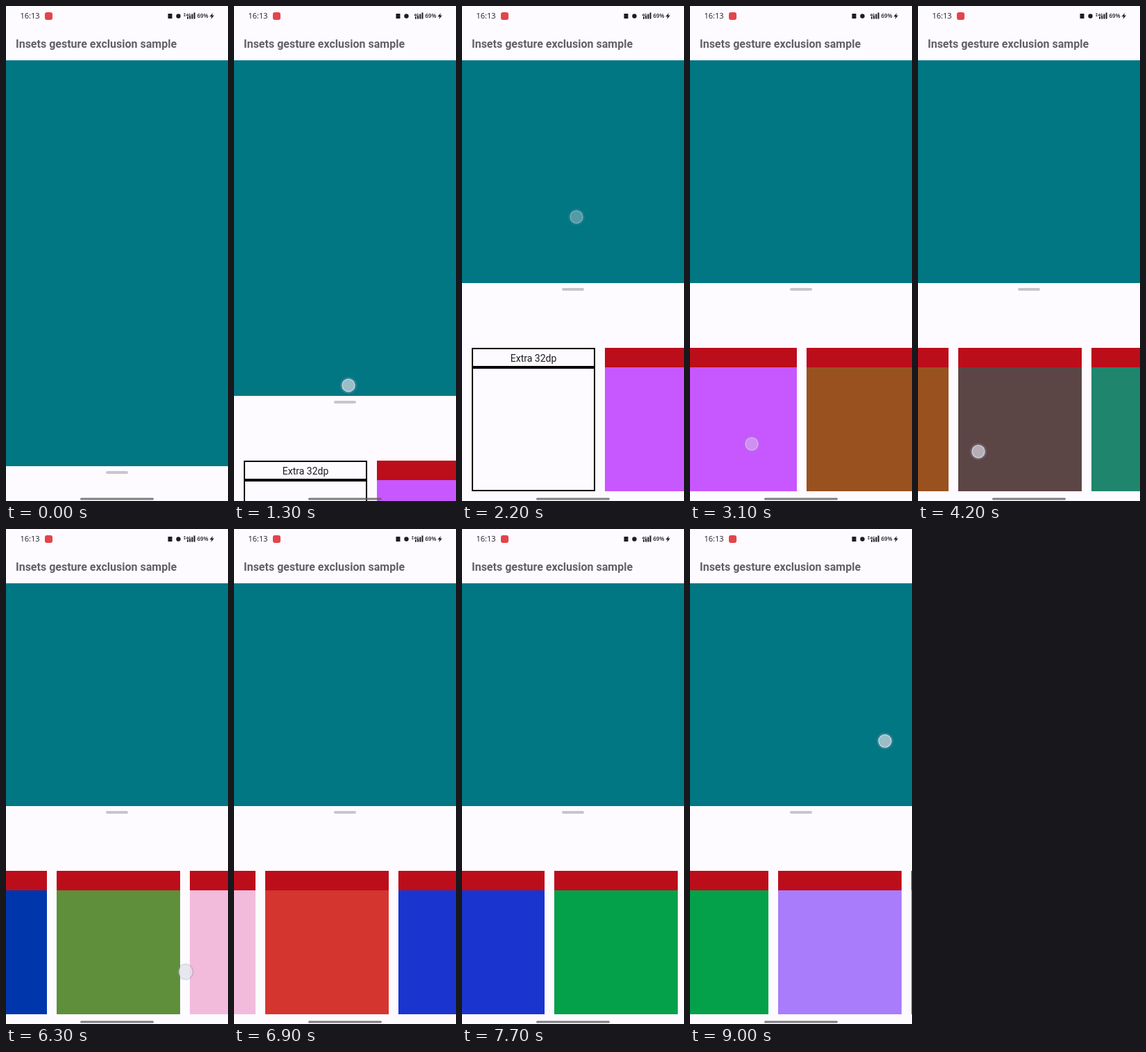
An HTML page with a canvas that plays this animation: 320 by 711 pixels, repeating every 9.1 s.

```html
<!DOCTYPE html>
<html lang="en">
<head>
<meta charset="utf-8">
<title>Insets gesture exclusion sample</title>
<style>
  html, body { margin: 0; width: 100%; height: 100%; overflow: hidden; background: #fdfbff; }
  canvas { display: block; width: 320px; height: 711px; }
</style>
</head>
<body>
<canvas id="stage"></canvas>
<script>
const W = 320, H = 711, LOOP = 9100, STEP = 100;
const COLLAPSED = 661, EXPANDED = 398, BAR = 78;
const CARD_W = 178, PITCH = 192, HEAD_H = 28, CARD_H = 206;
const PAPER = '#fdfbff';
const COLORS = ['', '#c757ff', '#9a5120', '#5c4545', '#20856d', '#af87bf', '#0036ac',
  '#5f8f3a', '#f2bbdc', '#d4352f', '#1a35cf', '#04a04a', '#a97cfc', '#8f8252'];

// Each swipe drags for DRAG ms up to "mid", then flings on to "end".
const DRAG = 300;
const SWIPES = [
  { t: 2800, mid: 230, end: 310, fling: 400, x: 89, y: 629, fade: 300 },
  { t: 3900, mid: 532, end: 800, fling: 600, x: 87, y: 640, fade: 400 },
  { t: 5000, mid: 1000, end: 1240, fling: 600, x: 116, y: 635, fade: 300 },
  { t: 6200, mid: 1450, end: 1706, fling: 600, x: 90, y: 636, fade: 300 },
  { t: 7300, mid: 1920, end: 2191, fling: 1000, x: 88, y: 636, fade: 300 }
];

const canvas = document.getElementById('stage');
const ctx = canvas.getContext('2d');
const dpr = window.devicePixelRatio || 1;
canvas.width = W * dpr;
canvas.height = H * dpr;

const clamp = (v, lo, hi) => Math.min(hi, Math.max(lo, v));
const during = (t, a, b) => t >= a && t < b;

function rect(x, y, w, h, color) {
  ctx.fillStyle = color;
  ctx.fillRect(x, y, w, h);
}

function pill(x, y, w, h, r, color) {
  ctx.fillStyle = color;
  ctx.beginPath();
  ctx.roundRect(x, y, w, h, r);
  ctx.fill();
}

function disc(x, y, r, color) {
  ctx.fillStyle = color;
  ctx.beginPath();
  ctx.arc(x, y, r, 0, 7);
  ctx.fill();
}

function text(str, x, y, font, color, align = 'left') {
  ctx.font = font;
  ctx.fillStyle = color;
  ctx.textAlign = align;
  ctx.fillText(str, x, y);
}

function pullY(t) {
  const u = clamp((t - 1100) / 900, 0, 1);
  return 303 + 365 * (1 - u) ** 1.637;
}

function sheetTop(t) {
  return t < 1100 ? COLLAPSED : clamp(pullY(t) + 15, EXPANDED, COLLAPSED);
}

const dragEase = dt => clamp(dt / DRAG, 0, 1) ** 1.4;

function scrollAt(t) {
  let pos = 0;
  for (const s of SWIPES) {
    const dt = t - s.t;
    if (dt < 0) break;
    const u = clamp((dt - DRAG) / s.fling, 0, 1);
    pos = dt < DRAG
      ? pos + (s.mid - pos) * dragEase(dt)
      : s.mid + (s.end - s.mid) * (1 - (1 - u) ** 3);
  }
  return pos;
}

function touchDot(x, y, alpha = 1) {
  ctx.globalAlpha = alpha;
  disc(x, y, 12, 'rgba(150,150,175,0.3)');
  disc(x, y, 9.5, 'rgba(240,240,245,0.55)');
  ctx.strokeStyle = 'rgba(235,240,250,0.5)';
  ctx.lineWidth = 1.5;
  ctx.beginPath();
  ctx.arc(x, y, 9, 0, 7);
  ctx.stroke();
  ctx.globalAlpha = 1;
}

function drawTouch(t) {
  if (during(t, 1100, 2300)) touchDot(165, pullY(t), t < 2200 ? 1 : 0.5);
  for (const s of SWIPES) {
    const dt = t - s.t;
    if (dt < 0 || dt > s.fade) continue;
    touchDot(305 + (s.x - 305) * dragEase(dt), s.y, dt < s.fade ? 1 : 0.6);
  }
  if (t >= 8600) touchDot(281, t < 9000 ? 283 : 304.5);
}

function drawStatus(t) {
  const ink = '#1d1c20';
  text('16:13', 20.5, 18, '11px "Open Sans", sans-serif', ink);
  pill(56, 9, 11, 11, 3, '#e2454b');
  rect(233.5, 11, 6, 7, ink);
  disc(248.5, 14.5, 3.2, ink);
  const dataOn = t < 700 || during(t, 1600, 1800) || during(t, 4000, 7600) || t >= 9000;
  if (dataOn) {
    rect(256.5, 10.5, 2, 1.6, ink);
    rect(256.5, 13.2, 2, 1.6, ink);
  }
  text('4G', 259.5, 14.6, 'bold 5.5px Roboto, sans-serif', ink);
  [3, 4, 7, 9].forEach((h, i) => rect(261 + i * 3.2, 18.5 - h, 2, h, ink));
  text('69%', 275.5, 17.4, '600 8px "Open Sans", sans-serif', ink);
  ctx.fillStyle = ink;
  ctx.beginPath();
  [[298, 10], [293.5, 15.2], [296.4, 15.2], [295.4, 19], [300, 13.6], [297.2, 13.6]]
    .forEach(([x, y]) => ctx.lineTo(x, y));
  ctx.fill();
}

function drawCards(top, scroll) {
  COLORS.forEach((color, i) => {
    const x = Math.round(14 + i * PITCH - scroll);
    if (x > W || x + CARD_W < 0) return;
    if (i) {
      rect(x, top, CARD_W, HEAD_H, '#bc0d1b');
      rect(x, top + HEAD_H, CARD_W, CARD_H - HEAD_H, color);
      return;
    }
    ctx.strokeStyle = '#000';
    ctx.lineWidth = 2;
    ctx.strokeRect(x + 1, top + 1, CARD_W - 2, HEAD_H - 2);
    ctx.strokeRect(x + 1, top + HEAD_H + 1, CARD_W - 2, CARD_H - HEAD_H - 2);
    text('Extra 32dp', x + CARD_W / 2, top + 19.5, '14px Roboto, sans-serif', '#1c1b1f', 'center');
  });
}

function draw(t) {
  const top = Math.round(sheetTop(t));
  ctx.setTransform(dpr, 0, 0, dpr, 0, 0);
  rect(0, 0, W, H, PAPER);
  drawStatus(t);
  text('Insets gesture exclusion sample', 14, 60, 'bold 16px Roboto, sans-serif', '#625f65');
  rect(0, BAR, W, top - BAR, '#007783');
  pill(144, top + 7, 32, 4, 2, '#c8c6ca');
  drawCards(top + 93, scrollAt(t));
  pill(107, 706.5, 106, 3, 1.5, 'rgba(95,93,97,0.8)');
  drawTouch(t);
}

const start = performance.now();
function tick() {
  const t = (performance.now() - start) % LOOP;
  draw(Math.floor(t / STEP) * STEP);
  requestAnimationFrame(tick);
}
tick();
</script>
</body>
</html>
```
